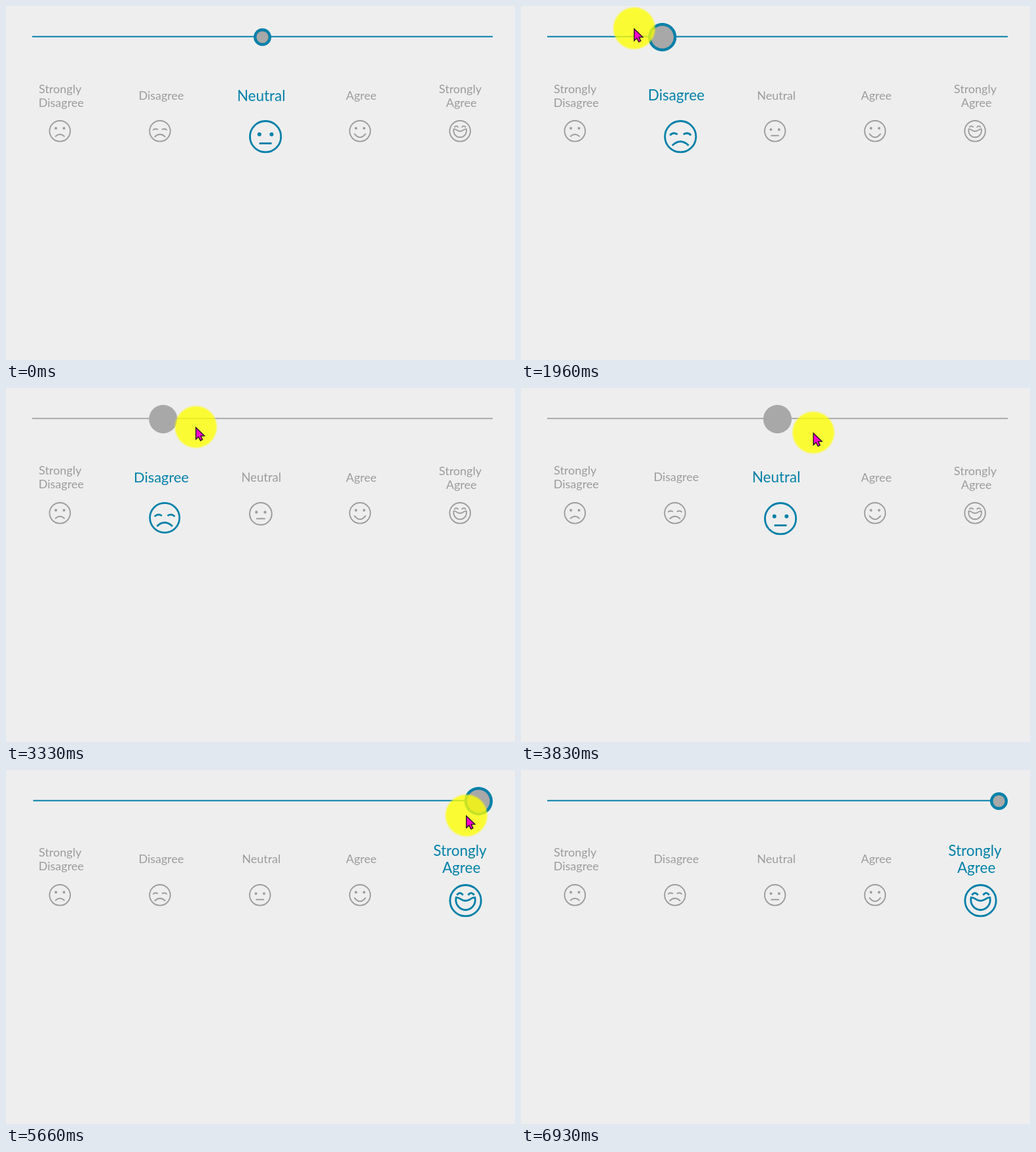
An HTML page with a canvas that plays this animation: 777x540 px, repeating every 6.96 s.

```html
<!DOCTYPE html>
<html lang="en">
<head>
<meta charset="utf-8">
<title>Opinion slider</title>
<style>
  html, body { margin: 0; height: 100%; overflow: hidden; background: #eee; }
  canvas { display: block; }
</style>
</head>
<body>
<canvas id="stage" width="777" height="540"></canvas>
<script>
const ctx = document.getElementById('stage').getContext('2d');
const LOOP = 6960, BLUE = '#0480a8', GRAY = '#9c9c9c';
const LEFT = 40, RIGHT = 743, FADE = 80;

const labels = ['Strongly Disagree', 'Disagree', 'Neutral', 'Agree', 'Strongly Agree'];

const dots = y => `M-4.2 ${y}a2 2 0 1 1 -4 0a2 2 0 1 1 4 0M8.2 ${y}a2 2 0 1 1 -4 0a2 2 0 1 1 4 0`;
const faces = [
  { eyes: dots(-4.2), lines: 'M-7.2 8.4Q0 1.6 7.2 8.4' },
  { lines: 'M-10.7 -1.3Q-7.5 -5 -3 -2.2M10.7 -1.3Q7.5 -5 3 -2.2M-8.3 9Q0 1 8.3 9' },
  { eyes: dots(-2.3), lines: 'M-6.3 6.9H6.3' },
  { eyes: dots(-4.2), lines: 'M-8.8 3.9Q0 15.2 8.8 3.9' },
  { lines: 'M-8.8 -5.6Q-5.7 -9.8 -2.6 -5.6M8.8 -5.6Q5.7 -9.8 2.6 -5.6' +
      'M-9.6 -3.2C-5 -3.2 -5 .2 0 .2S5 -3.2 9.6 -3.2C11 5 5 9.5 0 9.5S-11 5 -9.6 -3.2Z' }
].map(f => ({ eyes: new Path2D(f.eyes || ''), lines: new Path2D(f.lines) }));

const arrow = new Path2D('M0 0V18L4 14.3L7 20L10 18.5L7.4 13L13 12.6Z');

// [time, chosen answer]
const choices = [[-999, 2], [1410, 1], [2570, 0], [2960, 1], [3320, 2], [4010, 3], [4620, 4]];
// [mouse down, mouse up]
const presses = [[1200, 1960], [2600, 4100], [4660, 5160]];
// [time, x, y]
const path = [
  [300, 809, 48], [630, 480, 54], [860, 480, 54], [1230, 392, 59], [1400, 392, 59],
  [1500, 285, 59], [1660, 285, 59], [1730, 173, 34], [1960, 173, 34], [2250, 120, 32],
  [2600, 82, 40], [2830, 82, 40], [3500, 360, 66], [3530, 360, 66], [3830, 446, 68],
  [4130, 560, 68], [4330, 560, 68], [4500, 650, 67.5], [4700, 703, 68], [5660, 703, 68],
  [5790, 676, 235], [5930, 693, 428], [6300, 737, 575]
];

const clamp = (v, lo, hi) => Math.min(hi, Math.max(lo, v));
const ramp = (t, start) => clamp((t - start) / FADE, 0, 1);
const mix = (a, b, k) => a + (b - a) * k;

function cursorAt(t) {
  const i = path.findIndex(p => p[0] > t);
  if (i < 1) return null;
  const [a, b] = [path[i - 1], path[i]];
  const k = (t - a[0]) / (b[0] - a[0]);
  return [mix(a[1], b[1], k), mix(a[2], b[2], k)];
}

function disc(x, y, r, fill) {
  ctx.beginPath();
  ctx.arc(x, y, r, 0, 7);
  ctx.fillStyle = fill;
  ctx.fill();
}

function drawSlider(t, now, before) {
  const pressed = presses.some(([down, up]) => t >= down && t < up);
  const inset = t >= 5160 && t < 6930 ? 1.5 : 0;
  const r = mix(13.5, 21.7, ramp(t, 400) - ramp(t, 5680));
  const spot = i => clamp(LEFT + i * (RIGHT - LEFT) / 4, LEFT + r, RIGHT - r);
  const x = mix(spot(before[1]), spot(now[1]), ramp(t, now[0]));

  ctx.fillStyle = pressed ? '#999' : BLUE;
  ctx.fillRect(LEFT + inset, 45.7, RIGHT - LEFT - 2 * inset, pressed ? 1.6 : 2);
  if (pressed) return disc(x, 47.5, r, '#a8a8a8');
  disc(x, 47.5, r, BLUE);
  disc(x, 47.5, r - 4.4, '#a8a8a8');
}

function drawLabel(i, size, y) {
  const words = labels[i].split(' ');
  ctx.save();
  ctx.translate(84.3 + i * 152.7, y);
  ctx.scale(size, size);
  words.forEach((word, n) => {
    const first = words.length > 1 && n === 0;
    ctx.fillText(word, first ? -1.7 : 0, 6.3 + (n - (words.length - 1) / 2) * 21.2);
  });
  ctx.restore();
}

function drawFace(i, size) {
  ctx.save();
  ctx.translate(65.5 + i * 152.7, 174);
  ctx.scale(size, size);
  ctx.translate(16.8, 16.8);
  ctx.lineWidth = 1.9;
  ctx.beginPath();
  ctx.arc(0, 0, 15.8, 0, 7);
  ctx.stroke();
  ctx.stroke(faces[i].lines);
  ctx.fill(faces[i].eyes);
  ctx.restore();
}

function drawCursor([x, y]) {
  const glow = ctx.createRadialGradient(x, y, 30, x, y, 33.5);
  glow.addColorStop(0, 'rgba(255,255,0,.78)');
  glow.addColorStop(1, 'rgba(255,255,0,0)');
  disc(x, y, 34, glow);
  ctx.save();
  ctx.translate(x, y + 0.8);
  ctx.fillStyle = '#f0c';
  ctx.strokeStyle = '#201020';
  ctx.lineWidth = 1.4;
  ctx.fill(arrow);
  ctx.stroke(arrow);
  ctx.restore();
}

function draw(t) {
  const n = choices.findLastIndex(c => t >= c[0]);
  const now = choices[n], before = choices[Math.max(0, n - 1)];
  const k = ramp(t, now[0]);

  ctx.fillStyle = '#eee';
  ctx.fillRect(0, 0, 777, 540);
  drawSlider(t, now, before);

  ctx.font = '18px Lato, sans-serif';
  ctx.textAlign = 'center';
  labels.forEach((_, i) => {
    const chosen = i === now[1] ? k : i === before[1] ? 1 - k : 0;
    const moved = choices.some(c => c[0] > 0 && c[0] <= t && c[1] === i);
    ctx.fillStyle = ctx.strokeStyle = chosen > 0.5 ? BLUE : GRAY;
    drawLabel(i, 1 + chosen * 0.25, moved ? 136 : 136.8);
    drawFace(i, 1 + chosen * 0.5);
  });

  const cursor = cursorAt(t);
  if (cursor) drawCursor(cursor);
}

const start = performance.now();
function tick() {
  draw((performance.now() - start) % LOOP);
  requestAnimationFrame(tick);
}
tick();
</script>
</body>
</html>
```
